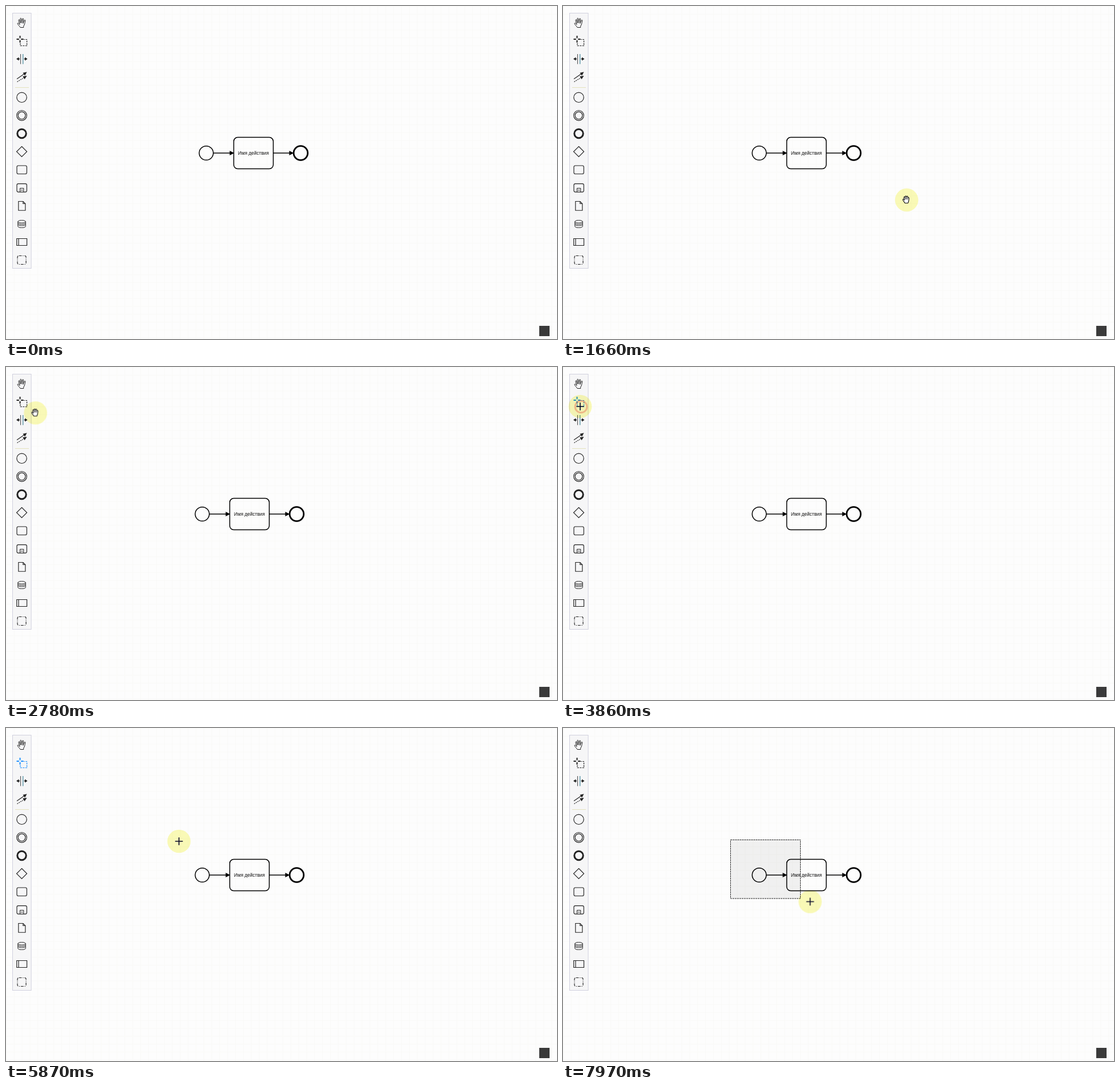
An HTML page that plays this animation: 962 by 582 pixels, repeating every 8 s.

```html
<!DOCTYPE html>
<html lang="ru">
<head>
<meta charset="utf-8">
<title>Диаграмма процесса</title>
<style>
  html, body { margin: 0; width: 100%; height: 100%; overflow: hidden; background: #fdfdfd; }
  svg { display: block; width: 962px; height: 582px; }
  .anim { animation: 8s linear infinite; }
  .step { animation-timing-function: step-end; }
  .icons { fill: none; stroke: #222; stroke-width: 1.15; }
  .solid { fill: currentColor; stroke: none; }

  #diagram { animation-name: pan; fill: none; stroke: #000; stroke-width: 1.5; }
  #diagram text { font: 8.28px "Liberation Sans", Arial, sans-serif; fill: #111; stroke: none; text-anchor: middle; }
  #lasso { animation-name: tool; color: #222; stroke: currentColor; }
  #halo { fill: #fbfbb8; mix-blend-mode: multiply; animation-name: travel; }
  #pointer { animation-name: travel; }
  #grab { animation-name: grab; }
  #cross { animation-name: cross; stroke: #080828; stroke-width: 1.6; }
  #marquee {
    x: 292.5px; y: 195.5px; fill: rgba(20, 20, 30, .055);
    stroke: #222; stroke-dasharray: 3 1; animation-name: select;
  }
  .click { fill: none; stroke: #e94848; stroke-width: 3; }
  #click1 { animation-name: click1; }
  #click2 { animation-name: click2; }

  @keyframes pan { 0% { transform: translate(7px, 0); } 11.5%, 100% { transform: none; } }
  @keyframes tool { 0%, 80%, 100% { color: #222; } 43% { color: #1e8fff; } }
  @keyframes grab { 0% { opacity: 1; } 43%, 100% { opacity: 0; } }
  @keyframes cross { 0% { opacity: 0; } 43%, 100% { opacity: 1; } }

  @keyframes travel {
    0%, 11.5% { transform: translate(985px, 449px); }
    20.75%, 22% { transform: translate(600px, 339px); }
    31.25% { transform: translate(110px, 111px); }
    32.5% { transform: translate(110px, 111px); animation-timing-function: cubic-bezier(.19, .75, .4, 1); }
    40%, 43% { transform: translate(30px, 69px); }
    53.25% { transform: translate(30px, 69px); animation-timing-function: cubic-bezier(.55, .07, .68, .36); }
    62.875% { transform: translate(269px, 180px); }
    64.125% { transform: translate(269px, 180px); animation-timing-function: ease-out; }
    67.5% { transform: translate(310px, 208px); animation-timing-function: ease-out; }
    73.375%, 74.625% { transform: translate(302px, 198px); }
    77.5%, 80% { transform: translate(293px, 196px); }
    83.875%, 85.125% { transform: translate(316px, 233px); }
    86.875% { transform: translate(328px, 249px); }
    94.375%, 95.625% { transform: translate(410px, 296px); }
    99.6%, 100% { transform: translate(431.5px, 303.5px); }
  }
  @keyframes select {
    0%, 81.5% { width: 0; height: 0; opacity: 0; }
    81.6% { width: 0; height: 0; opacity: 1; }
    83.875%, 85.125% { width: 9px; height: 15px; opacity: 1; }
    86.875% { width: 17px; height: 29px; }
    94.375%, 95.625% { width: 97px; height: 90px; }
    99.6%, 100% { width: 122px; height: 102.5px; opacity: 1; }
  }
  @keyframes click1 {
    0%, 43% { r: 0; opacity: 0; }
    43.1% { r: 1px; opacity: .75; }
    52.5%, 100% { r: 18px; opacity: 0; }
  }
  @keyframes click2 {
    0%, 80% { r: 0; opacity: 0; }
    80.1% { r: 1px; opacity: .75; }
    86.875% { r: 8px; opacity: .42; }
    95.625%, 100% { r: 18px; opacity: 0; }
  }
</style>
</head>
<body>
<svg viewBox="0 0 962 582">
  <defs>
    <pattern id="grid" width="13.8" height="13.8" patternUnits="userSpaceOnUse">
      <path d="M.5 0V13.8M0 .5H13.8" stroke="#f9f9f7" fill="none"/>
    </pattern>
    <path id="head" d="M0 0l-8-4v8z" fill="#000" stroke="none"/>
  </defs>
  <rect width="962" height="582" fill="#fdfdfd"/>
  <rect width="962" height="582" fill="url(#grid)"/>

  <g id="diagram" class="anim step">
    <circle cx="342.6" cy="257" r="12.3"/>
    <path d="M355 257H385M460 257H489"/>
    <use href="#head" x="391.5" y="257"/>
    <use href="#head" x="495.5" y="257"/>
    <rect x="390.6" y="229.6" width="69" height="55" rx="7"/>
    <circle cx="507.5" cy="257" r="12.3" stroke-width="2.8"/>
    <text x="425" y="259.5">Имя действия</text>
  </g>

  <rect id="marquee" class="anim"/>

  <rect x="11.5" y="12.5" width="32.5" height="446" fill="#f6f6f7" stroke="#d0d0de"/>
  <path d="M16 142.5H40" stroke="#e4e2bd"/>
  <g class="icons">
    <!-- hand -->
    <path d="M25 37.5c-1-2-3.6-4-4.7-6.2-.7-1.6.9-2 1.8-.8l1.9 2-2-7.2c-.4-1.7 1.4-2 1.8-.5l1.6 5.2-.6-7.5c0-1.7 1.8-1.7 2 0l.8 7.2 1-7c.3-1.5 2-1.2 1.9.4l-.5 7.3 2-5.2c.6-1.5 2.1-.8 1.7.7-.8 3.6-.9 6.3-3 9.3v2.3z" stroke-width="1"/>
    <!-- lasso -->
    <g id="lasso" class="anim step">
      <path d="M24.5 52v4.3M24.5 59.7V64M18.5 58h4.3M26.2 58h4.3" stroke-width="2"/>
      <path d="M25 65v4.5H36.5V58.5H31" stroke-dasharray="3 1.4"/>
    </g>
    <!-- space -->
    <path d="M25.5 84v17.5" stroke="#555"/>
    <path d="M29.7 84v17.5" stroke="#397f95"/>
    <path d="M20 92.5h4M31.5 92.5h4" stroke-width="1.6"/>
    <path class="solid" color="#222" d="M18 92.5l4.5-3v6zM37.5 92.5l-4.5-3v6z"/>
    <!-- connect -->
    <path d="M19 127.5L32 118.5"/>
    <path d="M19.5 132.5L32 125" stroke-dasharray="2 1.3"/>
    <path class="solid" color="#222" d="M36.5 115.3l-3.5 6.4-3.5-5zM36.5 122l-4 6-3.4-5z"/>
    <!-- events and gateway -->
    <circle cx="27.5" cy="159.8" r="8.7"/>
    <circle cx="27.5" cy="191.3" r="8.8"/>
    <circle cx="27.5" cy="191.3" r="6.4"/>
    <circle cx="27.5" cy="223" r="7.7" stroke-width="3"/>
    <path d="M27.5 245.5l9 9-9 9-9-9z"/>
    <!-- activities -->
    <rect x="19" y="279" width="17.3" height="14.5" rx="2.5"/>
    <rect x="19" y="310.6" width="17.3" height="14.5" rx="2.5"/>
    <path d="M24.5 325v-6.5h6.3v6.5M25.8 321.8h3.7" stroke-width="1"/>
    <!-- data -->
    <path d="M21.8 341.5h8l4 4v11.7h-12zM29.8 341.5v4h4"/>
    <g stroke-width="1">
      <ellipse cx="27.5" cy="376.8" rx="6.7" ry="2.3"/>
      <path d="M20.8 376.8v8.4c0 3 13.4 3 13.4 0v-8.4M20.8 379.2c0 3 13.4 3 13.4 0M20.8 381.6c0 3 13.4 3 13.4 0"/>
    </g>
    <!-- participant and group -->
    <path d="M18.7 406.5h17.8v12H18.7zM22 406.5v12"/>
    <rect x="20" y="436.5" width="15" height="15" rx="2.5" stroke-dasharray="5 1.8 1.2 1.8"/>
  </g>

  <rect x="931" y="559" width="18" height="18" fill="#3a3a3a"/>

  <circle id="click1" class="click anim" cx="31.5" cy="69.5"/>
  <circle id="click2" class="click anim" cx="293" cy="196.5"/>
  <circle id="halo" class="anim" r="20.3"/>
  <g id="pointer" class="anim">
    <g id="grab" class="anim step" fill="#fff" stroke="#111" stroke-width="1.1" stroke-linejoin="round">
      <path d="M-3 5.5c-.7-2-2.8-3.4-3.6-5.5-.5-1.5 1-2 1.8-.9l1 1.2-1-4.5c-.3-1.5 1.5-1.8 1.9-.4l.3 1-.2-2.2c0-1.6 1.9-1.6 2.1 0l.3 1.6.3-1.6c.4-1.4 2.1-1.1 2.1.4l0 1.8c.7-1.3 2.4-.8 2.2.7-.3 3.3-.4 5.7-2 8.4z"/>
      <path d="M-2.6-4l.7 3.2M-.5-4l.2 3M2-3l-.3 2.4" fill="none" stroke-width=".9"/>
    </g>
    <path id="cross" class="anim step" d="M-6.7 0H6.7M0-6.7V6.7"/>
  </g>
</svg>
</body>
</html>
```
